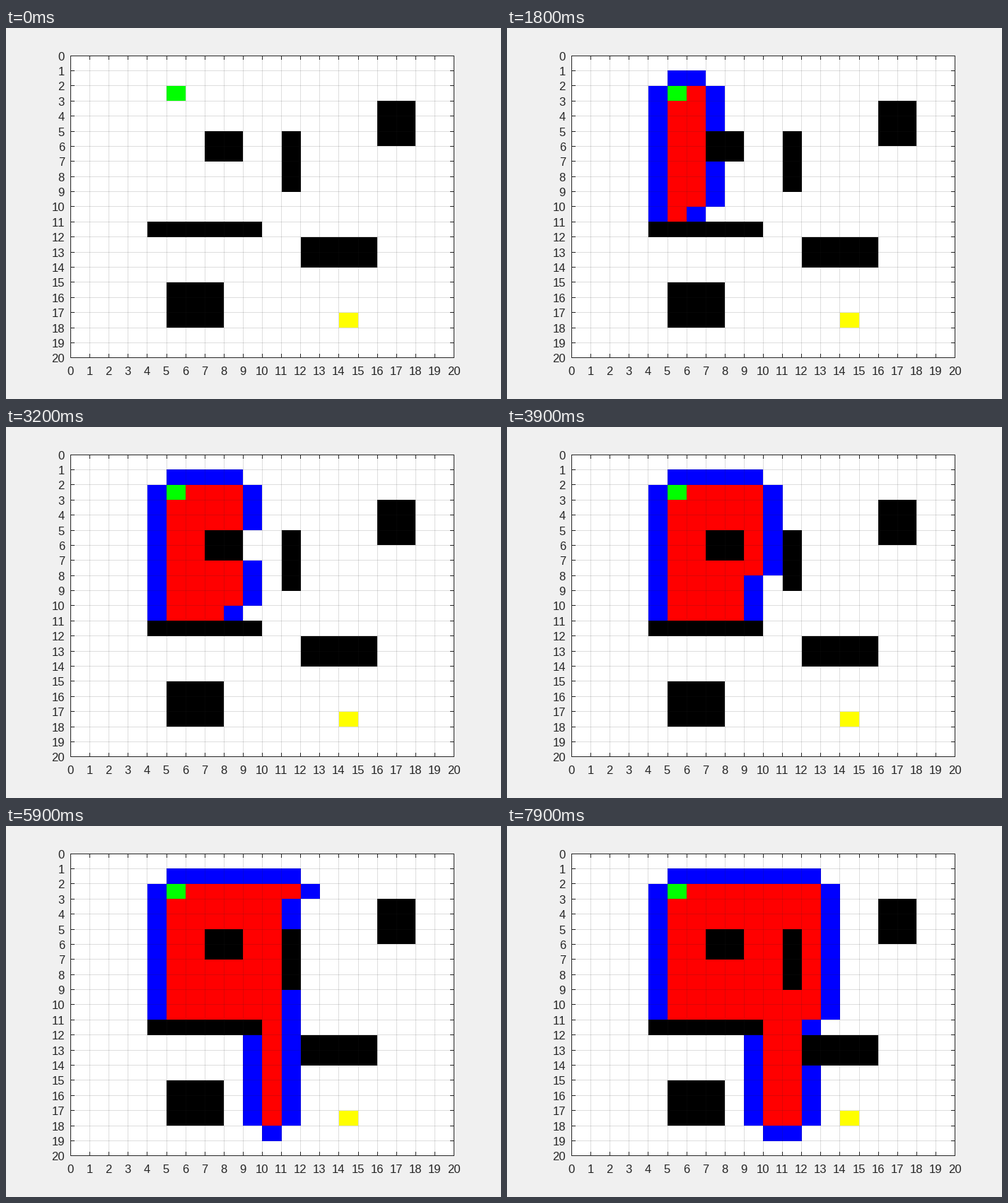
Recreate the animation shown at these times as a matplotlib script. Size 700 by 525 pixels, loop 8000 ms.

```python
import numpy as np
import matplotlib.pyplot as plt
from matplotlib.animation import FuncAnimation
from matplotlib.colors import ListedColormap
from matplotlib.patches import Rectangle

plt.rcParams["text.kerning_factor"] = 6

W, H, DPI = 700, 525, 100
N = 20
FRAMES, STEP_MS = 80, 100
INK = (0.15, 0.15, 0.15)
FREE, WALL, START, GOAL, OPEN, CLOSED = range(6)
COLORS = ["#ffffff", "#000000", "#00ff00", "#ffff00", "#0000ff", "#ff0000"]

start, goal = (5, 2), (14, 17)
# walls as x0, x1, y0, y1
WALLS = [(7, 9, 5, 7), (11, 12, 5, 9), (16, 18, 3, 6),
         (4, 10, 11, 12), (12, 16, 12, 14), (5, 8, 15, 18)]

# pixel positions of the grid lines
gx = 91.5 + 27.1 * np.arange(N + 1)
gy = 39.03 + 21.395 * np.arange(N + 1)
line_x, line_y = np.floor(gx), np.floor(gy)


def make_map():
    cells = np.full((N, N), FREE)
    for x0, x1, y0, y1 in WALLS:
        cells[y0:y1, x0:x1] = WALL
    cells[start[1], start[0]] = START
    cells[goal[1], goal[0]] = GOAL
    return cells


def search(steps):
    """A* with Manhattan distance; ties go to the lowest column, then row."""
    cells = make_map()
    cost = {start: 0}
    fringe = {start}
    states = [cells.copy()]

    def rank(p):
        h = abs(p[0] - goal[0]) + abs(p[1] - goal[1])
        return (cost[p] + h, p)

    for _ in range(steps):
        node = min(fringe, key=rank)
        fringe.remove(node)
        x, y = node
        if node != start:
            cells[y, x] = CLOSED
        for nx, ny in ((x + 1, y), (x - 1, y), (x, y + 1), (x, y - 1)):
            inside = 0 <= nx < N and 0 <= ny < N
            if inside and cells[ny, nx] == FREE:
                cells[ny, nx] = OPEN
                cost[nx, ny] = cost[node] + 1
                fringe.add((nx, ny))
        states.append(cells.copy())
    return states


states = search(FRAMES - 2)

fig = plt.figure(figsize=(W / DPI, H / DPI), dpi=DPI, facecolor=(0.94, 0.94, 0.94))
ax = fig.add_axes([0, 0, 1, 1])
ax.set_xlim(0, W)
ax.set_ylim(H, 0)
ax.axis("off")


def bar(x, y, w, h, alpha=1.0):
    ax.add_patch(Rectangle((x, y), w, h, fc=INK, ec="none", lw=0,
                           alpha=alpha, antialiased=False, zorder=2))


def label(x, y, text, align):
    ax.text(x, y, text, ha=align, va="baseline", color=INK,
            family="Liberation Sans", fontsize=12)


mesh = ax.pcolormesh(np.round(gx), np.round(gy), states[0],
                     cmap=ListedColormap(COLORS), vmin=-0.5, vmax=5.5,
                     antialiased=False, zorder=1)

left, right = line_x[0], line_x[-1]
top, bottom = line_y[0], line_y[-1]
wide, tall = right - left + 1, bottom - top + 1
TICK = 6

for x in line_x[1:-1]:
    bar(x, top + 1, 1, tall - 2, 0.15)
    bar(x, top, 1, TICK)
    bar(x, bottom + 1 - TICK, 1, TICK)
for y in line_y[1:-1]:
    bar(left + 1, y, wide - 2, 1, 0.15)
    bar(left, y, TICK, 1)
    bar(right + 1 - TICK, y, TICK, 1)
for y in (top, bottom):
    bar(left, y, wide, 1)
for x in (left, right):
    bar(x, top, 1, tall)

for k in range(N + 1):
    label(gx[k] - 0.5, 491, str(k), "center")
    label(83, line_y[k] + 7, str(k), "right")


def draw(i):
    mesh.set_array(states[max(0, i - 1)])
    return [mesh]


anim = FuncAnimation(fig, draw, frames=FRAMES, interval=STEP_MS,
                     init_func=lambda: draw(0), repeat=True, repeat_delay=0)
plt.show()
```
